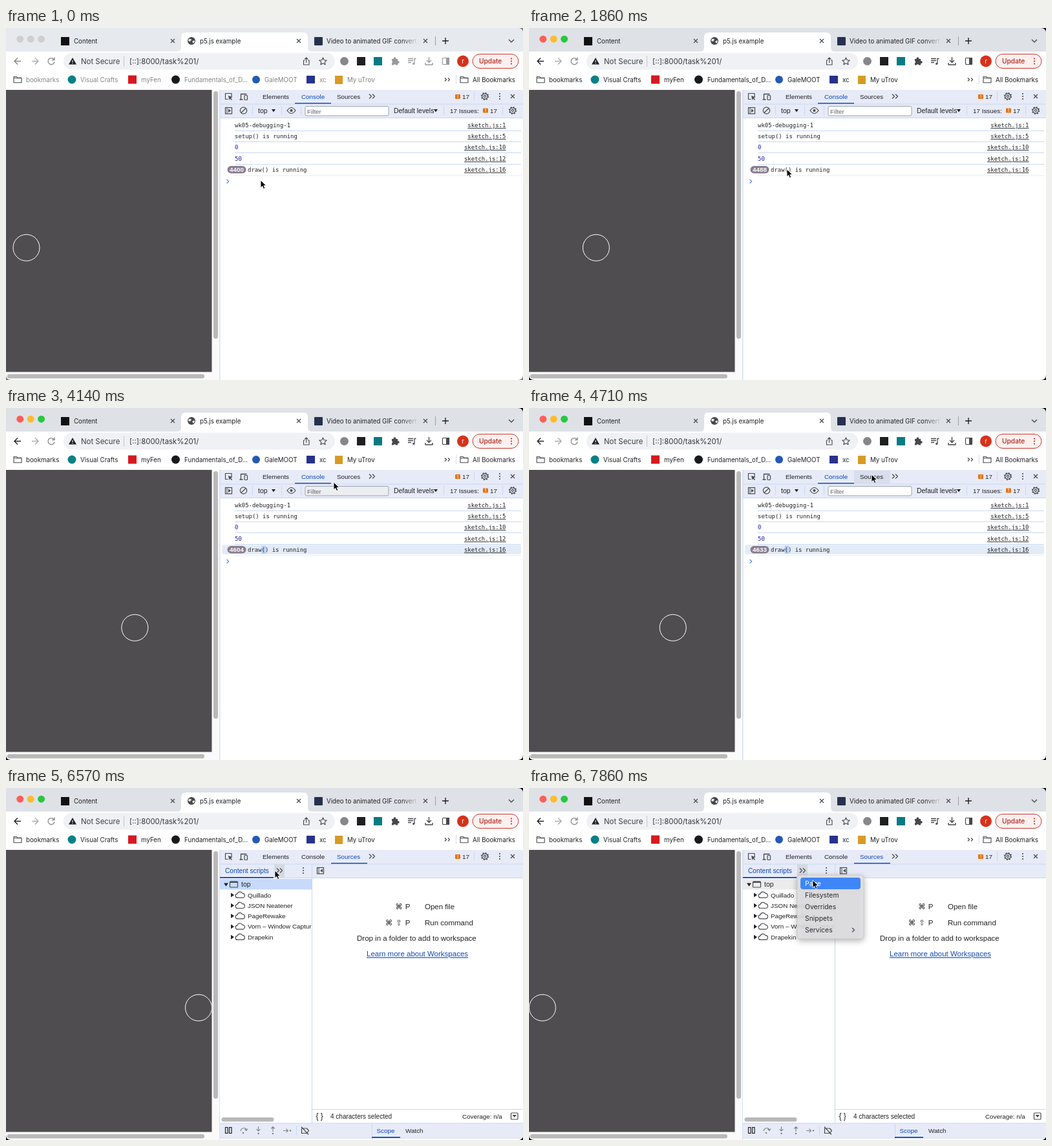
These frames come from a looping animation (800 by 546 pixels, 8 s). An HTML page:

```html
<!DOCTYPE html>
<html lang="en">
<head>
<meta charset="utf-8">
<title>Console and sources</title>
<style>
html, body { margin: 0; width: 100%; height: 100%; overflow: hidden; background: #111; }
svg { display: block; width: 100vw; height: 100vh; }
text { font-family: "Liberation Sans", "DejaVu Sans", sans-serif; white-space: pre; }
.ui { font-family: Inter, "Liberation Sans", sans-serif; }
.mono { font-family: "DejaVu Sans Mono", monospace; }
</style>
</head>
<body>
<svg id="stage" viewBox="0 0 800 546"></svg>
<script>
const INK = '#202124', ICON = '#46484c', BLUE = '#0d48b8', BAR = '#e7ebf7', LINE = '#c8d8f3';

// Drawing helpers; text is placed by its optical centre line.
const rect = (x, y, w, h, fill, rx = 0, more = '') =>
  `<rect x="${x}" y="${y}" width="${w}" height="${h}" rx="${rx}" fill="${fill}" ${more}/>`;
const disc = (x, y, r, fill, more = '') => `<circle cx="${x}" cy="${y}" r="${r}" fill="${fill}" ${more}/>`;
const ring = (x, y, r, color = ICON, w = 1.2) => disc(x, y, r, 'none', `stroke="${color}" stroke-width="${w}"`);
const stroke = (d, color = ICON, w = 1.2) =>
  `<path d="${d}" fill="none" stroke="${color}" stroke-width="${w}" stroke-linejoin="round"/>`;
const shape = (d, fill = ICON) => `<path d="${d}" fill="${fill}"/>`;
const frame = (x, y, w, h, rx = 0, color = ICON) => rect(x, y, w, h, 'none', rx, `stroke="${color}" stroke-width="1.2"`);
const text = (x, y, str, size = 9.85, fill = INK, more = '') =>
  `<text x="${x}" y="${y + size * .36}" font-size="${size}" fill="${fill}" ${more}>${str}</text>`;
const ui = (x, y, str, size = 9.75, fill = INK, more = '') => text(x, y, str, size, fill, `class="ui" ${more}`);
const mono = (x, y, str, fill = INK, more = '') => text(x, y, str, 8.95, fill, `class="mono" ${more}`);
const group = (id, body) => `<g id="${id}">${body}</g>`;
const hline = (x, y, w, color = LINE) => rect(x, y, w, 1, color);
const vline = (x, y, h, color = LINE) => rect(x, y, 1, h, color);
const cross = (x, y, r = 3) => stroke(`M${x - r} ${y - r}l${2 * r} ${2 * r}m0 ${-2 * r}l${-2 * r} ${2 * r}`);
const dots = (x, y, color = ICON) => [-4, 0, 4].map(d => disc(x, y + d, 1.1, color)).join('');
const more = (x, y, r = 3.5) => stroke(`M${x - 4} ${y - r}l${r} ${r}l${-r} ${r}m5 ${-2 * r}l${r} ${r}l${-r} ${r}`);
const folder = (x, y) => stroke(`M${x} ${y - 4.5}h4.5l1.5 1.8h6v7.5h-12zM${x} ${y - 2.2}h12`, ICON, 1.1);
const gear = (x, y) => ring(x, y, 4.2, ICON, 1.3) + ring(x, y, 1.6, ICON, 1.1) +
  disc(x, y, 5.4, 'none', `stroke="${ICON}" stroke-width="1.5" stroke-dasharray="2.1 2.14"`);
const issue = (x, y) => rect(x - 4, y - 3.5, 8, 7, '#e8710a', 1) +
  text(x, y, '!', 6.5, '#fff', 'text-anchor="middle" font-weight="700"');
const caret = (x, y) => shape(`M${x} ${y - 2}h6l-3 4.5z`, INK);

function browser() {
  const lights = (id, colors) => group(id, colors.map((c, i) => disc(21.8 + 16.4 * i, 17.2, 5.5, c)).join(''));
  const bookmarks = [[31, 'bookmarks'], [115, 'Visual Crafts'], [209, 'myFen'], [276, 'Fundamentals_of_D...'],
    [400, 'GaleMOOT'], [485, 'xc'], [528, 'My uTrov']];
  return rect(0, 0, 800, 97, '#dee1e6') + rect(0, 0, 800, 37, '#e6e9ed', 0, 'id="paleStrip"') +
    lights('lightsOff', ['#cfcfd1', '#cfcfd1', '#cfcfd1']) + lights('lightsOn', ['#fe5f57', '#febc2e', '#28c840']) +
    shape('M264 37q7 0 7-7V14q0-7 7-7H460q7 0 7 7V30q0 7 7 7z', '#fff') + rect(0, 36.5, 800, 60, '#fff') +
    rect(85, 14, 13, 13, '#111') + ui(105, 20, 'Content') + cross(258, 20) +
    disc(287, 20, 6, ICON) + shape('M283 17q3-1 4 1l-2 3-3-1zM288 21l3-2 1 2-2 3z', '#e8eaed') +
    ui(300, 20, 'p5.js example') + cross(453, 20) +
    rect(477, 14, 13, 13, '#26314f', 1) + ui(496, 20, 'Video to animated GIF convert', 9.75, 'url(#fade)') +
    cross(649, 20) + vline(664, 13, 14, '#9aa0a6') + stroke('M680 15v10m-5-5h10', INK, 1.4) +
    stroke('M778 18l4 4l4-4', ICON, 1.4) +
    group('dimNav', stroke('M23 51.5h-10m5-5l-5 5l5 5', INK, 1.4)) +
    stroke('M40 51.5h10m-5-5l5 5l-5 5', '#aaaeb3', 1.4) +
    stroke('M74 48.5a5 5 0 1 0 1 4M75 45.5v4h-4', '#8a8d91', 1.4) +
    rect(89, 38.5, 420, 26, '#eff1f4', 13) +
    shape('M103 46l6 10.5h-12zM102.4 50v3h1.2v-3zm0 4v1.2h1.2v-1.2z', INK) +
    ui(116, 51.5, 'Not Secure', 11.4, '#3c4043') + vline(182, 43, 17, '#c4c7cc') +
    ui(191, 51.5, '[::]:8000/task%201/', 11.4, '#333639') +
    stroke('M462.5 50h-2v7h8.5v-7h-2M464.7 54v-8m-2.5 2.5l2.5-2.5l2.5 2.5', ICON, 1.1) +
    stroke('M490.5 46l1.7 3.7 4 .4-3 2.7.9 4-3.6-2.1-3.6 2.1.9-4-3-2.7 4-.4z', ICON, 1.1) +
    disc(523.5, 51.5, 6.5, '#85878a') + rect(543, 45, 13, 13, '#1d1f21') + rect(569, 45, 13, 13, '#087a85') +
    group('dimTools',
      shape('M597 48h2.8a1.9 1.9 0 1 1 3.4 0h3v3.2a1.9 1.9 0 1 1 0 3.6v2.7h-3a1.9 1.9 0 0 0-3.6 0H597v-3a1.9 1.9 0 0 0 0-3.5z') +
      stroke('M622 47.5h8m-8 3h8m-8 3h5m5 2v-8h2.5', ICON, 1.3) + disc(630.7, 55.5, 1.6, ICON) +
      stroke('M654.5 45v8.5m-3.5-3.5l3.5 3.5l3.5-3.5M649 54v3h11v-3', ICON, 1.4) +
      frame(675.5, 46.5, 10, 10, 1) + rect(681, 46, 5, 11, ICON)) +
    disc(707, 51.5, 9, '#d5321b') + ui(707, 51.5, 'r', 9.5, '#fff', 'text-anchor="middle"') +
    rect(722, 40.5, 71, 22, '#fdf0ef', 11, 'stroke="#c5362b"') +
    ui(732, 51.5, 'Update', 10.2, '#b3261e', 'font-weight="500"') + dots(782, 51.5, '#b3261e') +
    folder(12, 80) + disc(102, 80, 6.5, '#078087') + rect(189, 73.5, 13, 13, '#d71920') +
    disc(262.5, 80, 6.5, '#17191c') + disc(387, 80, 6, '#2459b5') + rect(465, 74, 13, 12, '#27328c') +
    rect(509, 74, 12, 13, '#d79b24') +
    group('dimMarks', bookmarks.map(([x, s]) => ui(x, 80, s)).join('')) +
    more(683, 80, 2.5) + vline(696, 73, 14, '#d5dcea') + folder(703, 80) + ui(722, 80, 'All Bookmarks');
}

function page() {
  return rect(0, 96, 331, 450, '#fafafa') + rect(0, 96, 318.5, 437.5, '#504d50') +
    `<g clip-path="url(#page)">${disc(0, 340.8, 20.5, 'none', 'id="ball" stroke="#fff"')}</g>` +
    rect(321, 98, 7, 384, '#b9b9b9', 3.5) + rect(2, 537, 305, 6.5, '#b9b9b9', 3.2);
}

function devtools() {
  return rect(331, 96, 469, 450, '#fff') + rect(331, 96, 469, 43.5, BAR) + vline(330.4, 96, 450, '#c2d2ee') +
    rect(503, 97, 56, 20, '#d8deeb', 0, 'id="tabHover"') +
    stroke('M349 107v-5.5h-9.5v9h4') + shape('M344 105l6.5 2.3-2.7 1.2 2.2 2.4-1 1-2.3-2.4-1.2 2.4z') +
    stroke('M363.5 110.5v-8h9M361.5 111h5', ICON, 1.3) + frame(369, 104.5, 4.5, 7, 1) +
    text(397, 106, 'Elements') +
    group('consoleTab', text(457, 106, 'Console', 9.85, BLUE) + rect(447, 116, 56, 1.8, BLUE)) +
    group('consoleIdle', text(457, 106, 'Console')) +
    group('sourcesTab', text(512, 106, 'Sources', 9.85, BLUE) + rect(503, 116, 56, 1.8, BLUE)) +
    group('sourcesIdle', text(512, 106, 'Sources')) + more(566, 106) +
    issue(699, 106.5) + text(706, 106.5, '17') + vline(724, 99, 14) + gear(741, 106) + dots(764, 106) + cross(784, 106) +
    hline(331, 117.5, 469);
}

function consolePane() {
  const rows = [[151, 'wk05-debugging-1', 1], [168, 'setup() is running', 5], [185, '0', 10], [203, '50', 12]];
  const link = (y, n) => mono(773.5, y, `sketch.js:${n}`, INK, 'text-anchor="end" text-decoration="underline"');
  return group('console',
    frame(339.5, 123.5, 10, 9.5) + vline(341.5, 123, 10, ICON) + shape('M344 125.5l4 2.7-4 2.7z') +
    ring(367.5, 128, 5.2) + stroke('M364 131.5l7-7') +
    vline(381, 121, 14) + text(390, 128, 'top', 10.5) + caret(411, 128) + vline(426, 121, 14) +
    stroke('M435 128q6.5-9 13 0q-6.5 9-13 0z') + disc(441.5, 128, 2, ICON) + vline(456, 121, 14) +
    rect(463, 121.5, 129, 14.5, '#fff', 2, 'id="filter" stroke="#9da3ad"') + text(466, 129, 'Filter', 9.85, '#60646c') +
    text(600, 128, 'Default levels', 10.4) + caret(662, 128) + vline(677, 121, 14) +
    text(687, 128, '17 Issues:') + issue(742, 128) + text(749, 128, '17') + vline(768, 121, 14) + gear(784, 128) +
    hline(331, 139, 469) +
    rows.map(([y, s, n]) => mono(354, y, s, isNaN(s) ? INK : '#1a1aa6') + link(y, n) + hline(354, y + 8, 443)).join('') +
    hline(354, 228.5, 443, '#e4ecf8') +
    group('selected', rect(334, 212.5, 463, 14.5, '#e3ebf7', 3) + rect(395.6, 213.5, 6.5, 12.5, '#b5d0f8')) +
    rect(342.5, 214, 29, 11.5, '#8b7c91', 5.7) +
    text(357, 219.7, '', 9.8, '#fff', 'id="count" text-anchor="middle" font-weight="700"') +
    mono(374, 220, 'draw() is running') + link(220, 16) +
    stroke('M341.5 235l3.2 3l-3.2 3', '#5b8ee6'));
}

function sourcesPane() {
  const scripts = ['Quillado', 'JSON Neatener', 'PageRewake', 'Vorn – Window Capture', 'Drapekin'];
  const faint = '#83868c';
  const leaf = (s, i) => {
    const y = 166 + 16.3 * i;
    return shape(`M348 ${y - 3.5}l5 3.5-5 3.5z`, INK) +
      stroke(`M358.4 ${y + 4.2}a3 3 0 0 1-.4-6a4.2 4.2 0 0 1 7.8-.8a3.4 3.4 0 0 1 .4 6.8z`) +
      text(374, y, s);
  };
  const key = (x, y, s) => text(x, y, s, 11.5, INK, 'text-anchor="middle"');
  return group('sources',
    rect(331, 139, 469, 407, '#fff') + rect(415, 118.5, 16, 20, '#d5d9e2', 0, 'id="moreHover"') +
    hline(331, 139, 469) +
    text(339, 128, 'Content scripts', 10.2, BLUE) + rect(331, 138, 83, 1.8, BLUE) + more(423, 128) + dots(460, 128) +
    frame(481.5, 123.5, 10, 9.5) + vline(483.5, 123, 10, ICON) + shape('M490 125.5l-4 2.7 4 2.7z') +
    rect(331, 141, 142, 16.5, '#c7dafb', 0, 'id="treeTop"') + shape('M337 147.5h7l-3.5 5z', INK) +
    frame(346.5, 145, 12, 9, 1) + rect(346.5, 145, 12, 2, ICON) +
    text(364, 149.5, 'top', 10.4) + `<g clip-path="url(#tree)">${scripts.map(leaf).join('')}</g>` +
    rect(333.5, 511, 81, 6.5, '#b9b9b9', 3.2) + vline(473, 118, 402) +
    key(608, 184, '⌘') + key(621.5, 184, 'P') + text(648, 184, 'Open file', 11.5) +
    key(592.5, 208.5, '⌘') + key(608, 208.5, '⇧') + key(621.5, 208.5, 'P') + text(648, 208.5, 'Run command', 11.5) +
    text(543, 233, 'Drop in a folder to add to workspace', 11.5) +
    text(558, 257.3, 'Learn more about Workspaces', 11.5, BLUE, 'text-decoration="underline"') +
    hline(474, 498, 326) +
    text(479.5, 509, '{ }', 12) + text(502, 509, '4 characters selected', 10) + text(706, 509, 'Coverage: n/a') +
    frame(781.5, 504, 10.5, 10, 1) + shape('M783.5 507h6.5l-3.2 4z') +
    rect(331, 520, 469, 23, BAR) + hline(331, 519.5, 469) + hline(331, 542.5, 469) +
    frame(339.5, 526.5, 3.5, 9, 0, INK) + frame(345.5, 526.5, 3.5, 9, 0, INK) +
    stroke('M363 532q1-4.5 5-4.5t4 3.5m-2.5-2l2.5 2.5l2-3', faint) + disc(367, 535, 1.3, faint) +
    stroke('M390.5 525v7m-2.8-2.8l2.8 2.8l2.8-2.8M413 533v-7.5m-2.8 2.8l2.8-2.8l2.8 2.8M429 531.5h7m-2.5-2.8l2.8 2.8l-2.8 2.8', faint) +
    [[390.5, 536], [413, 536], [440, 531.5]].map(([x, y]) => disc(x, y, 1.3, faint)).join('') +
    vline(449, 524, 15) + stroke('M457.5 528h8l3 3.5-3 4h-8zM457 525.5l11 12') +
    vline(566, 520, 26) + text(573.5, 531, 'Scope', 9.85, BLUE) + rect(566, 541, 44, 1.8, BLUE) + text(618, 531, 'Watch'));
}

function menu() {
  return group('menu',
    rect(415, 135, 103, 99, '#e1e0e2', 5, 'fill-opacity=".89" stroke="#c3c2c5" stroke-width=".7" style="filter:drop-shadow(0 3px 5px #0005)"') +
    rect(420, 139, 93, 18, '#3e86f7', 4, 'id="picked"') + ui(427, 148, 'Page', 10.4, INK, 'id="pageItem"') +
    ['Filesystem', 'Overrides', 'Snippets', 'Services'].map((s, i) => ui(427, 166.5 + 18 * i, s, 10.4, '#2b2b2e')).join('') +
    stroke('M500 217l3.5 3.3l-3.5 3.3'));
}

const stage = document.getElementById('stage');
stage.innerHTML = `<defs>
  <clipPath id="win"><path d="M0 0H792q8 0 8 8V538q0 8-8 8H8q-8 0-8-8z"/></clipPath>
  <clipPath id="page"><path d="M0 96h318.5v437.5H0z"/></clipPath>
  <clipPath id="tree"><path d="M331 139h142v370H331z"/></clipPath>
  <linearGradient id="fade" gradientUnits="userSpaceOnUse" x1="612" x2="638"><stop stop-color="${INK}"/><stop offset="1" stop-color="${INK}" stop-opacity="0"/></linearGradient>
  </defs>${rect(0, 0, 800, 546, '#111', 0, 'id="desk"')}
  <g clip-path="url(#win)">${browser()}${page()}${devtools()}${consolePane()}${sourcesPane()}${menu()}</g>
  <path id="cursor" d="M0 0V11.8L2.7 9.3 4.5 13.5 6.7 12.6 4.9 8.5H8.6Z" fill="#000" stroke="#fff" stroke-width=".9"/>`;

// Tables of [step, value...]; the picture changes seven times a second.
const CURSOR = [[0, 394, 236], [9, 399, 219], [17, 399, 219], [22, 429, 219], [29, 507, 115], [33, 530, 103],
  [38, 530, 103], [46, 416, 128], [50, 416, 128], [55, 439, 143]];
const CALLS = [[0, 4400], [13, 4488], [22, 4554], [29, 4604], [37, 4661], [46, 4724], [55, 4787]];
const el = id => document.getElementById(id);
const show = (id, on) => el(id).style.display = on ? '' : 'none';

function sample(table, step, ease = u => u) {
  const i = Math.max(1, table.findIndex(row => row[0] >= step));
  const [from, ...a] = table[i - 1], [to, ...b] = table[i];
  const u = ease((step - from) / (to - from));
  return a.map((v, j) => v + (b[j] - v) * u);
}

function render(time) {
  const step = Math.min(55, Math.floor(time * .007 + .03));
  const [calls] = sample(CALLS, step);
  const [x, y] = sample(CURSOR, step, u => u * u * (3 - 2 * u));
  const active = step >= 11, inSources = step >= 35, menuOpen = step >= 50, onPage = step >= 53;

  el('ball').setAttribute('cx', (31.5 + (calls - 4400) * .8225) % 329);
  el('count').textContent = Math.round(calls);
  el('cursor').setAttribute('transform', `translate(${x} ${y})`);

  el('desk').setAttribute('fill', active ? '#0b0b0e' : '#77777a');
  for (const id of ['dimNav', 'dimTools', 'dimMarks']) el(id).style.opacity = active ? 1 : .55;
  show('paleStrip', !active);
  show('lightsOff', !active);
  show('lightsOn', active);
  show('selected', step >= 15);
  for (const id of ['console', 'consoleTab', 'sourcesIdle']) show(id, !inSources);
  for (const id of ['sources', 'sourcesTab', 'consoleIdle']) show(id, inSources);
  show('tabHover', step >= 31 && step < 40);
  show('moreHover', step >= 45);
  show('menu', menuOpen);
  show('picked', onPage);
  el('pageItem').setAttribute('fill', onPage ? '#fff' : '#2b2b2e');
  el('treeTop').setAttribute('fill', menuOpen ? '#ececec' : '#c7dafb');
  el('filter').setAttribute('fill', step >= 28 && step < 30 ? '#eceef2' : '#fff');
}

const start = performance.now();
function tick() {
  render((performance.now() - start) % 8000);
  requestAnimationFrame(tick);
}
tick();
</script>
</body>
</html>
```
